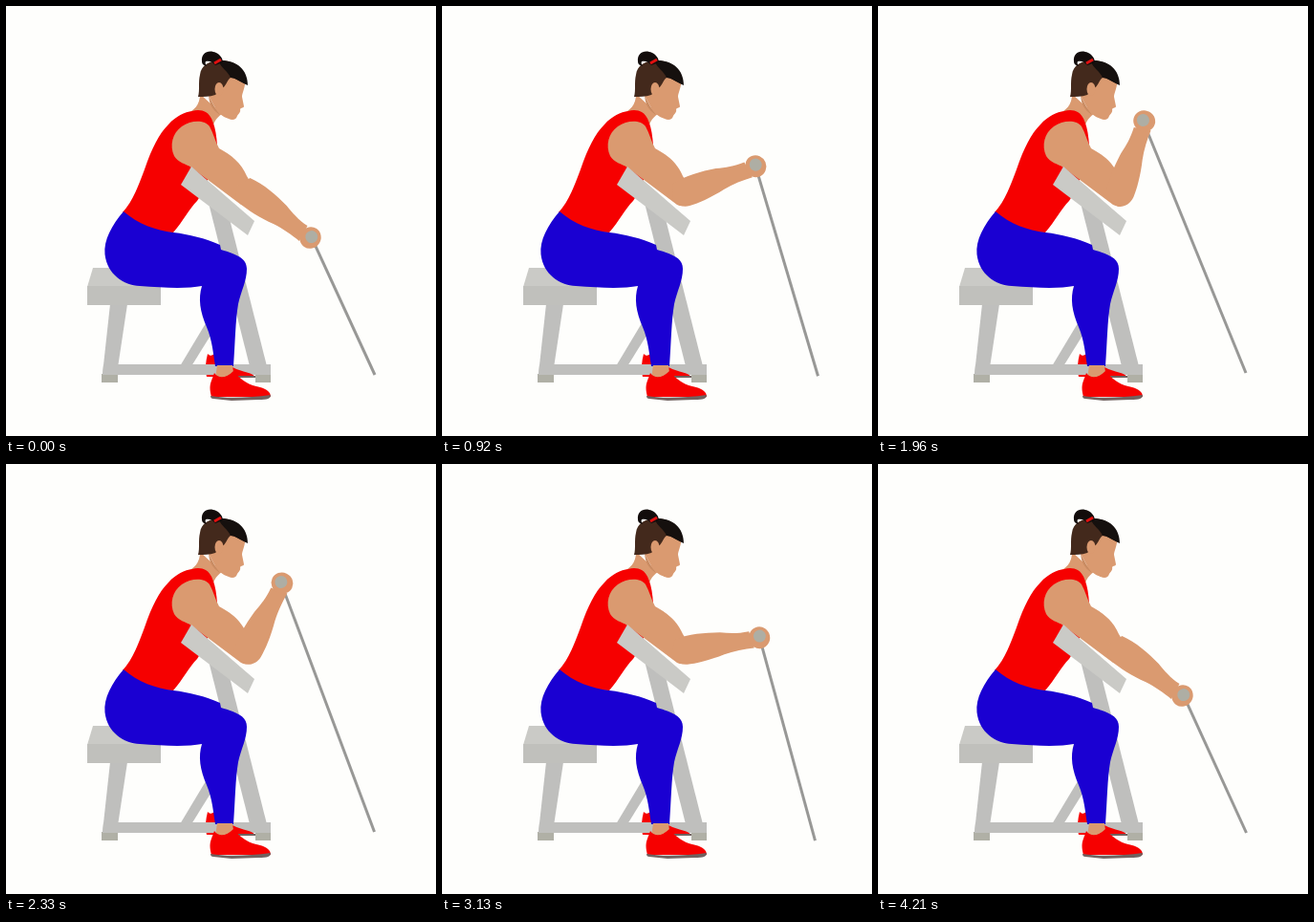
These frames come from a looping animation (450 by 450 pixels, 4250 ms). An HTML page:

```html
<!DOCTYPE html>
<html lang="en">
<head>
<meta charset="utf-8">
<title>Cable preacher curl</title>
<style>
  html, body { margin: 0; width: 100%; height: 100%; overflow: hidden; background: #fefefc; }
  svg { display: block; width: 100vw; height: 100vh; }
  .skin { fill: #da9a70; }
  .red { fill: #f60000; }
  .frame { fill: #bfbfbd; }
  .foot { fill: #b0b0a6; }
  .sole { fill: #716260; }
</style>
</head>
<body>
<svg viewBox="0 0 450 450">
  <!-- bench and far shoe -->
  <path class="red" d="M211 364C214 367 216 366 219 363V388H210C208 380 209 372 211 364Z"/>
  <path class="frame" d="M212 206L231 211L273 377H255Z"/>
  <path class="frame" d="M215 322L222 332L194 377H182Z"/>
  <path class="frame" d="M109 312H127L116 385H101Z"/>
  <path class="foot" d="M100 385H117V394H100ZM261 385H277V394H261Z"/>
  <path class="frame" d="M102 375H277V386H101Z"/>
  <path class="red" d="M234 376C243 383 255 382 261 388H234Z"/>
  <path class="sole" d="M234 387H261V389H234Z"/>
  <path fill="#cacac6" d="M91 274H165L162 294H85Z"/>
  <path fill="#c0c0bc" d="M85 293H162V313H85Z"/>

  <!-- head -->
  <path class="skin" d="M203 92C203 104 197 109 187 114L216 130C217 122 219 118 226 113Z"/>
  <path fill="#c98b62" d="M212 94L219 107L224 114C216 109 213 103 212 94Z"/>
  <path class="skin" d="M214 78L236 72L250 78C251 84 247 91 247 95L249 105C249 107 246 106 245 108C246 111 243 113 242 115C241 119 237 120 233 118C226 116 221 111 218 105L212 94Z"/>
  <path fill="#43291c" d="M203 72C204 62 213 57 225 57C240 57 251 66 252 82C246 80 240 75 235 75C231 78 230 85 226 86L219 93C213 95 207 95 201 95C203 88 201 80 203 72Z"/>
  <path fill="#15100e" d="M222 57C241 56 253 66 253 83C246 80 240 75 235 75C232 68 226 66 222 57Z"/>
  <ellipse class="skin" cx="223" cy="87" rx="4.5" ry="7"/>
  <path fill="#120c0b" d="M205 58C204 49 212 45 220 49C224 51 227 55 227 59L219 62C216 58 212 57 209 58C208 60 209 61 210 63C206 62 205 60 205 58Z"/>
  <path stroke="#e01010" stroke-width="3" d="M218 60L225 56"/>

  <!-- body -->
  <path class="red" d="M122 216C133 204 139 187 145 171C153 148 160 134 170 124C178 115 187 111 195 110C200 108 206 109 209 111C215 114 220 126 221 146L222 156L205 196L200 204C191 213 185 226 175 237C155 237 138 229 122 216Z"/>
  <path fill="#1a00d2" d="M123 215C111 229 102 245 103.500 260C106 281 123 292 140 293C165 295 190 296 205 293C201 306 203 320 210 336C216 350 217 365 219 377H238C240 350 240 330 243 312C246 298 252 288 252 275C252 264 242 260 225 255L224 250C208 243 192 239 175 237C157 235 138 228 123 215Z"/>
  <path class="skin" d="M221 376H237L239 390H219Z"/>
  <path class="red" d="M215 392L218 384C223 391 231 389 238 382C246 392 255 397 266 399C273 401 277 404 277 409H215C213 402 213 397 215 392Z"/>
  <path class="sole" d="M214 408C230 411 255 410 277 407C277 411 274 412 264 412L236 413L217 411C215 411 214 410 214 408Z"/>

  <!-- arm and cable -->
  <path class="skin" d="M213 126C217 133 219 142 223 149C236 156 246 164 252 178L264 198C261 209 252 211 246 208L194 169C188 165 180 164 176 157C171 146 174 133 184 126C194 119 208 119 213 126Z"/>
  <line id="cable" stroke="#989896" stroke-width="3"/>
  <g id="forearm">
    <path class="skin" d="M-8 -14C8 -17 24 -15 40 -12C50 -9 58 -7 70 -7L72 11C62 10 50 10 40 11.500C24 14.500 8 15 0 14C-9 13 -14 6 -14 0Z"/>
    <ellipse class="skin" cx="79.500" cy="1.500" rx="11" ry="11.500"/>
    <circle cx="80" cy="0" r="6.500" fill="#aeaea4"/>
  </g>
  <path fill="#cacac6" d="M194 168L260 225L253 240L183 187Z"/>
</svg>
<script>
const LOOP = 4250;
const ELBOW = { x: 254, y: 196 };
const REACH = 79.5;
const LOWERED = 34.7, RAISED = -73;

// Lower end of the cable: time, x, y
const cablePath = [
  [0, 386, 386], [540, 387, 390], [700, 391, 391], [1080, 395, 385],
  [1330, 388, 380], [1960, 385, 384], [2670, 386, 386], [3250, 391, 395],
  [3580, 388, 392], [4210, 385.5, 386], [LOOP, 386, 386]
];
const cable = document.getElementById("cable");
const forearm = document.getElementById("forearm");

const mix = (a, b, k) => a + (b - a) * k;

function ease(t, start, end) {
  const k = Math.min(1, Math.max(0, (t - start) / (end - start)));
  return (1 - Math.cos(Math.PI * k)) / 2;
}

function cableEnd(t) {
  const i = cablePath.findIndex(point => point[0] > t);
  const [t0, x0, y0] = cablePath[i - 1];
  const [t1, x1, y1] = cablePath[i];
  const k = ease(t, t0, t1);
  return { x: mix(x0, x1, k), y: mix(y0, y1, k) };
}

function draw(t) {
  const lift = ease(t, 100, 1690) - ease(t, 1950, 4115);
  const angle = mix(LOWERED, RAISED, lift);
  const radians = angle * Math.PI / 180;
  const end = cableEnd(t);
  forearm.setAttribute("transform", `translate(${ELBOW.x} ${ELBOW.y}) rotate(${angle})`);
  cable.setAttribute("x1", ELBOW.x + REACH * Math.cos(radians));
  cable.setAttribute("y1", ELBOW.y + REACH * Math.sin(radians));
  cable.setAttribute("x2", end.x);
  cable.setAttribute("y2", end.y);
}

const start = performance.now();
function tick() {
  draw((performance.now() - start) % LOOP);
  requestAnimationFrame(tick);
}
tick();
</script>
</body>
</html>
```
